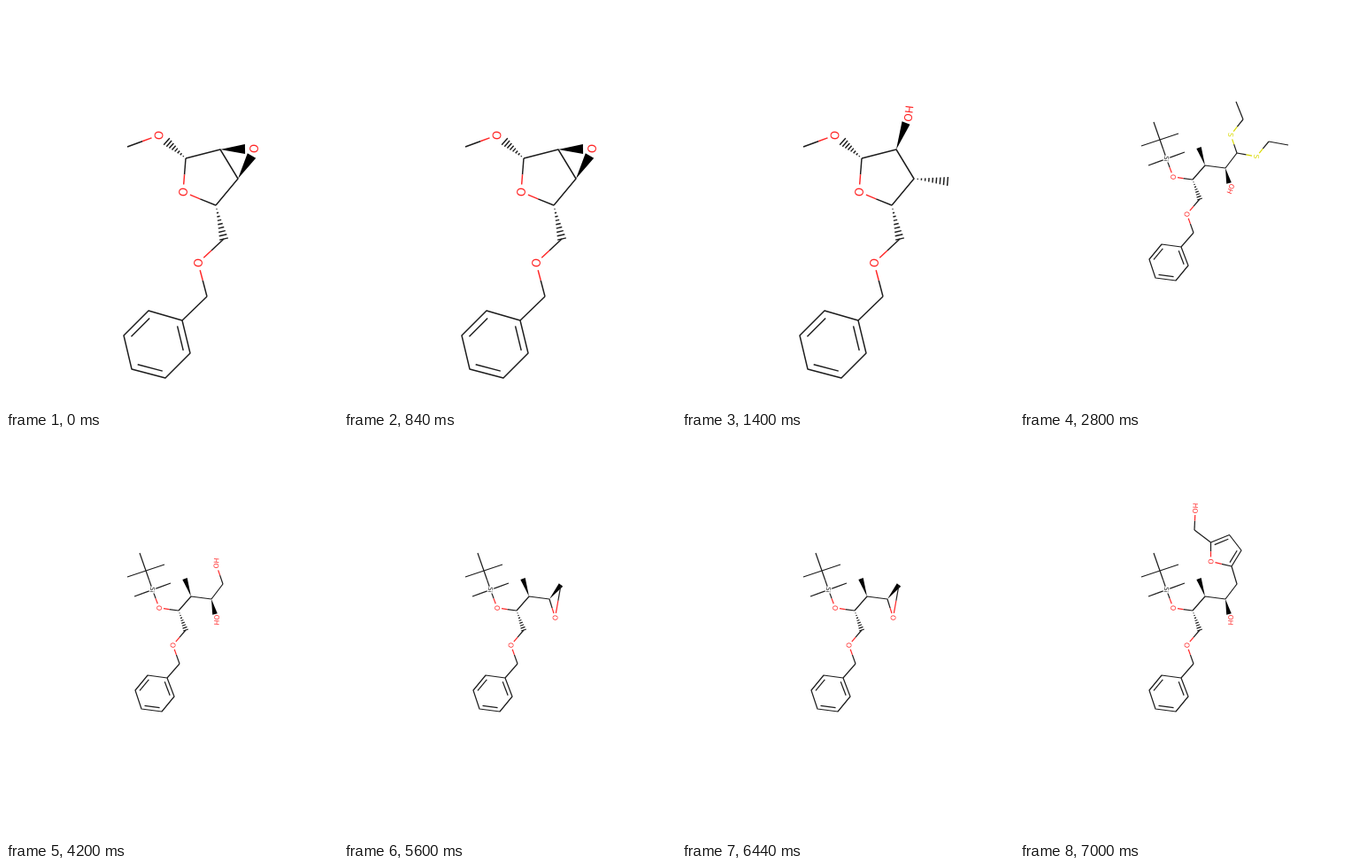
An HTML page with a canvas for the animation above (8000 ms loop, 375 px wide and 455 px high).

```html
<!DOCTYPE html>
<html lang="en">
<head>
<meta charset="utf-8">
<title>Synthesis steps</title>
<style>
html, body { margin: 0; width: 100%; height: 100%; overflow: hidden; background: #fff; }
canvas { display: block; }
</style>
</head>
<body>
<canvas width="375" height="455"></canvas>
<script>
const ctx = document.querySelector('canvas').getContext('2d');
const INK = '#1c1c1c', RED = '#ff2626', YELLOW = '#d9d900', GREY = '#222';
const STEP = 1400, LOOP = 8000;
let scale = 1;

const mix = (a, b, t) => [a[0] + (b[0] - a[0]) * t, a[1] + (b[1] - a[1]) * t];

function unit(a, b) {
  const length = Math.hypot(b[0] - a[0], b[1] - a[1]);
  return [(b[0] - a[0]) / length, (b[1] - a[1]) / length, length];
}

function path(points, color = INK) {
  ctx.strokeStyle = color;
  ctx.lineWidth = 0.85 + 0.6 * scale;
  ctx.lineJoin = 'round';
  ctx.beginPath();
  for (const p of points) ctx.lineTo(...p);
  ctx.stroke();
}

// Bond from a carbon to a labelled atom, stopping short of the label.
function toAtom(carbon, atom, color = RED, gap = 8.5 * scale) {
  const [, , length] = unit(carbon, atom);
  const end = mix(carbon, atom, 1 - gap / length);
  const middle = mix(carbon, atom, 0.48);
  path([carbon, middle]);
  path([middle, end], color);
}

function wedge(tip, end, width = 9.5 * scale) {
  const [x, y] = unit(tip, end), h = width / 2;
  ctx.fillStyle = '#000';
  ctx.beginPath();
  ctx.moveTo(...tip);
  ctx.lineTo(end[0] - y * h, end[1] + x * h);
  ctx.lineTo(end[0] + y * h, end[1] - x * h);
  ctx.fill();
}

function hash(tip, end, count = 9, width = 10 * scale) {
  const [x, y] = unit(tip, end);
  for (let i = 1; i <= count; i++) {
    const t = i / count, [px, py] = mix(tip, end, t), h = width * t / 2;
    path([[px - y * h, py + x * h], [px + y * h, py - x * h]]);
  }
}

function label(text, [x, y], color = RED, angle = 95, size = 13 * scale) {
  ctx.save();
  ctx.translate(x, y);
  ctx.rotate(angle * Math.PI / 180);
  ctx.font = `${size}px "DejaVu Sans", sans-serif`;
  ctx.textAlign = 'center';
  ctx.textBaseline = 'alphabetic';
  ctx.fillStyle = color;
  ctx.fillText(text, 0, size * 0.365);
  ctx.restore();
}

// Second line of a double bond, on the side of the ring center.
function innerLine(a, b, center, inset, trim) {
  const [x, y] = unit(a, b), m = mix(a, b, 0.5);
  const side = Math.sign((center[0] - m[0]) * -y + (center[1] - m[1]) * x) * inset;
  path([mix(a, b, trim), mix(a, b, 1 - trim)].map(p => [p[0] - y * side, p[1] + x * side]));
}

function benzene(points) {
  path([...points, points[0], points[1]]);
  const center = mix(points[0], points[3], 0.5);
  for (const i of [1, 3, 5])
    innerLine(points[i], points[(i + 1) % 6], center, 6.8 * scale, 0.13);
}

function sugar() {
  scale = 1;
  const c1 = [203, 172], c2 = [242, 162], c3 = [262, 195], c4 = [237, 225];
  const ringO = [200, 210], methoxyO = [172.5, 146], benzylO = [217, 290];
  path([c1, c2, c3, c4]);
  toAtom(c1, ringO);
  toAtom(c4, ringO);
  toAtom([137, 159], methoxyO);
  hash(c1, [181.5, 153], 8);
  hash(c4, [246, 263]);
  toAtom([246, 263], benzylO);
  toAtom([227, 328], benzylO);
  path([[227, 328], [199, 355]]);
  benzene([[199, 355], [161, 344], [133, 372], [142, 410], [180, 420], [208, 392]]);
  for (const atom of [ringO, methoxyO, benzylO]) label('O', atom);
  return { c2, c3 };
}

const C2 = [232, 183], C1 = [245, 166];

function chain() {
  scale = 0.6;
  const c3 = [209, 180], c4 = [195, 196], c5 = [203, 218];
  const benzylO = [188.5, 235], silylO = [173, 193], si = [165.5, 172.5], quat = [158, 151];
  path([c4, c3, C2]);
  wedge(c3, [202, 160]);
  hash(c4, c5, 8);
  toAtom(c4, silylO);
  toAtom(si, silylO, RED, 5);
  toAtom(c5, benzylO);
  toAtom([196, 256], benzylO);
  path([[196, 256], [182, 272]]);
  benzene([[182, 272], [160, 269], [146, 286], [153, 307], [176, 310], [190, 293]]);
  ctx.fillStyle = '#fff';
  ctx.fillRect(si[0] - 4, si[1] - 4, 8, 8);
  for (const end of [[145, 180], [186, 165], quat]) toAtom(end, si, GREY, 4);
  for (const end of [[151, 131], [137, 158], [179, 144]]) path([quat, end]);
  label('Si', si, GREY, 95, 7);
  label('O', silylO);
  label('O', benzylO);
}

function lowerHydroxyl(angle = 93) {
  wedge(C2, [236, 200]);
  label('OH', [238, 206.5], RED, angle, 7.6);
}

function epoxySugar() {
  const { c2, c3 } = sugar();
  wedge(c2, [270, 161.5], 11);
  wedge(c3, [277.5, 169], 11);
  label('O', [280, 161]);
}

function openedSugar() {
  const { c2, c3 } = sugar();
  wedge(c2, [253, 132]);
  hash(c3, [300, 198]);
  label('HO', [256, 121.5], RED, 97, 12);
}

function dithioacetal() {
  chain();
  lowerHydroxyl(112);
  const s1 = [238, 145.5], s2 = [267, 170];
  path([C2, C1]);
  for (const s of [s1, s2]) toAtom(C1, s, YELLOW);
  toAtom([252, 128], s1, YELLOW);
  path([[252, 128], [244, 108]]);
  toAtom([281, 153], s2, YELLOW);
  path([[281, 153], [303, 157]]);
  label('S', s1, YELLOW);
  label('S', s2, YELLOW);
}

function diol() {
  chain();
  lowerHydroxyl();
  path([C2, C1]);
  toAtom(C1, [238, 145.5]);
  label('HO', [237.5, 142.5], RED, 93, 7.6);
}

function epoxide() {
  chain();
  const oxygen = [238.5, 204];
  wedge(C2, [245, 167]);
  toAtom(C2, oxygen);
  toAtom([245, 167], oxygen);
  label('O', oxygen);
}

function furan() {
  chain();
  lowerHydroxyl();
  const ring = [[215.5, 119], [236.5, 110.5], [250, 128], [239, 146]];
  const oxygen = [215.5, 140.5], center = [231, 129];
  path([...ring, C1, C2]);
  toAtom(ring[0], oxygen);
  toAtom(ring[3], oxygen);
  innerLine(ring[0], ring[1], center, 4, 0.13);
  innerLine(ring[2], ring[3], center, 4, 0.13);
  path([ring[0], [197, 105]]);
  toAtom([197, 105], [198, 83]);
  label('O', oxygen);
  label('HO', [198, 80.5], RED, 93, 7.6);
}

const scenes = [epoxySugar, openedSugar, dithioacetal, diol, epoxide, furan];

function frame(now) {
  ctx.fillStyle = '#fff';
  ctx.fillRect(0, 0, 375, 455);
  scenes[Math.floor((now % LOOP) / STEP)]();
  requestAnimationFrame(frame);
}
frame(0);
</script>
</body>
</html>
```
